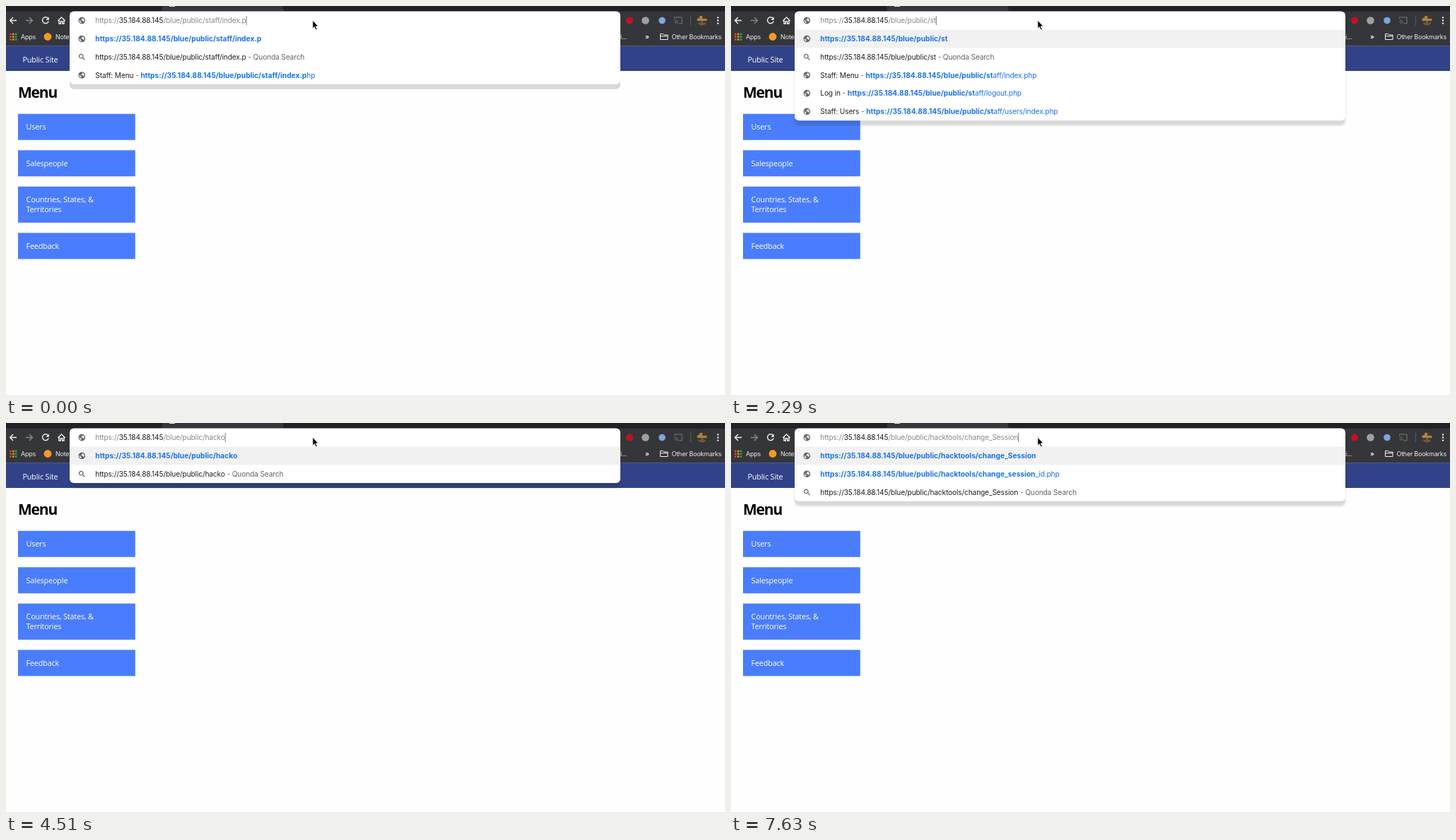
An HTML page that plays this animation: 1017 px wide and 551 px high, repeating every 8 s.

```html
<!DOCTYPE html>
<html lang="en">
<head>
<meta charset="utf-8">
<title>Address bar</title>
<style>
  html, body { margin: 0; width: 100%; height: 100%; overflow: hidden; background: #fff; }
  svg { display: block; width: 100vw; height: 100vh; }
  text { white-space: pre; }
  .page { font: 10.8px "Open Sans", "Noto Sans", sans-serif; letter-spacing: -.15px; fill: #fff; }
  .page .title { font-size: 21px; font-weight: 700; letter-spacing: -1.2px; fill: #000; }
  .bar { font: 9px Inter, Roboto, sans-serif; letter-spacing: -.24px; fill: #e8eaed; }
  .omni { font: 10.2px Inter, Roboto, sans-serif; letter-spacing: -.15px; fill: #202124; }
  .dim { fill: #5f6368; }
  .pale { fill: #85898d; }
  .link { fill: #1a73e8; }
  .hit { fill: #1a73e8; font-weight: 700; letter-spacing: .012px; }
  .line { fill: none; stroke: #f1f3f4; stroke-width: 1.4; }
</style>
</head>
<body>
<svg viewBox="0 0 1017 551" preserveAspectRatio="none">
  <defs>
    <filter id="blur" x="-5%" y="-20%" width="110%" height="150%"><feGaussianBlur stdDeviation="1.7"/></filter>
    <clipPath id="face"><circle cx="984.5" cy="20.5" r="7"/></clipPath>
    <g id="globe">
      <circle r="4.8" fill="#5f6368"/>
      <path d="M-3.7-.8L-.8 1.6V3.8C-2.8 3.4-4 1.6-3.7-.8ZM.6-3.7C2.4-3.2 3.6-1.8 3.7.2L2.2 1.8 1.2.2-1.2-.4-.6-1.8.8-2.2Z" fill="#e4e5e6"/>
    </g>
    <g id="lens" fill="none" stroke="#5f6368" stroke-width="1.2">
      <circle cx="-1" cy="-1" r="2.8"/><path d="M1 1L4.2 4.2"/>
    </g>
  </defs>

  <rect width="1017" height="551" fill="#fefefe"/>
  <rect width="1017" height="9" fill="#202124"/>
  <path d="M217 8Q221 8 221 3V0H392V3Q392 8 396 8Z" fill="#35363a"/>
  <rect x="231" width="8" height="1" fill="#e8eaed"/>
  <rect y="7.6" width="1017" height="49" fill="#35363a"/>
  <rect y="56.4" width="1017" height="35.6" fill="#314289"/>

  <g class="line">
    <path d="M15 20.5H6M10 16L5.6 20.5 10 25"/>
    <path d="M28 20.5H37M33 16L37.4 20.5 33 25" stroke="#85878a"/>
    <path d="M59.4 17.4A4.4 4.4 0 1 0 60.2 21.5"/>
    <path d="M73.4 21L78.5 16 83.6 21M75 20V25H77.3V21.8H79.7V25H82V20"/>
  </g>
  <path d="M60.8 15.4V19.8H56.4Z" fill="#f1f3f4"/>
  <g id="apps"></g>
  <circle cx="59" cy="43.5" r="5.4" fill="#f59a23"/>
  <g class="bar">
    <text x="21" y="46.8">Apps</text>
    <text x="70" y="46.8">Notes</text>
    <text x="869" y="46.8">i...</text>
    <text x="904" y="46.8" font-weight="700">»</text>
    <text x="941.5" y="46.8">Other Bookmarks</text>
  </g>
  <path d="M925.5 39.5H929.5L930.8 41H936V47.5H925.5ZM925.5 42.7H936" class="line" style="stroke-width:1"/>
  <circle cx="882" cy="20.5" r="5" fill="#c4121f"/>
  <circle cx="904.5" cy="20.5" r="5.3" fill="#9da0a3"/>
  <circle cx="928" cy="20.5" r="4.8" fill="#7fa5dc"/>
  <path d="M945.5 18V16H956V25H952M945.5 20A5 5 0 0 1 950.5 25M945.5 22.5A2.5 2.5 0 0 1 948 25" fill="none" stroke="#76797c"/>
  <path d="M968.5 14V27" stroke="#5b5d61"/>
  <g clip-path="url(#face)">
    <rect x="977" y="13" width="15" height="15" fill="#4b3a25"/>
    <path d="M977 17H981V14H985V18H992V21H977Z" fill="#a8834e"/>
    <path d="M977 24H983V21H986V24H992V28H977Z" fill="#6f5a38"/>
  </g>
  <g fill="#f1f3f4">
    <circle cx="1007" cy="16.4" r="1.2"/><circle cx="1007" cy="20.5" r="1.2"/><circle cx="1007" cy="24.6" r="1.2"/>
  </g>

  <g class="page">
    <text x="23.5" y="79.5">Public Site</text>
    <text x="17" y="129.5" class="title">Menu</text>
    <g fill="#4a7dfd">
      <rect x="17" y="152.8" width="165.8" height="37"/>
      <rect x="17" y="204.3" width="165.8" height="37"/>
      <rect x="17" y="255.7" width="165.8" height="51.2"/>
      <rect x="17" y="321.4" width="165.8" height="37"/>
    </g>
    <text x="28.5" y="175">Users</text>
    <text x="28.5" y="226.7">Salespeople</text>
    <text x="28.5" y="278">Countries, States, &amp;</text>
    <text x="28.5" y="292.4">Territories</text>
    <text x="28.5" y="344">Feedback</text>
  </g>

  <g id="panel" class="omni"></g>
  <rect id="caret" y="14" width=".9" height="13" fill="#6a6d70"/>
  <path d="M433.8 20.3V31.9L436.4 29.5 438.3 33.9 440.2 33.1 438.3 28.8H441.8Z" stroke="#fff" stroke-width=".8"/>
</svg>
<script>
const LOOP = 8000, TEXT_X = 126.3, TOP = 7.6, PITCH = 25.72;
const SCHEME = "https://", HOST = "35.184.88.145", FOLDER = "/blue/public/";
const BASE = SCHEME + HOST + FOLDER;
const $ = id => document.getElementById(id);

// Suggestions: [title, path below BASE]
const PAGES = {
  M: ["Staff: Menu", "staff/index.php"],
  L: ["Log in", "staff/logout.php"],
  U: ["Staff: Users", "staff/users/index.php"],
  H: ["Fernolix", ""],
  I: ["Fernolix", "index.php"],
  C: ["Change PHPSESSIONID", "hacktools/change_session_id.php"],
  B: ["", "hacktools/change_session_id.php"],
  P: ["Salesperson: Loren Pavik", "salesperson.php?id=1%27 AND SLEEP(5)=0--%27"],
  Q: ["", "salesperson.php?id=4 %27 OR SLEEP(5)=0--%27"]
};

// [time, typed path, rows]; u = typed address, s = web search
const STEPS = [
  [0, "staff/index.p", "usM"],
  [300, "staff/index.", "usM"],
  [480, "staff/index", "usM"],
  [660, "staff/ind", "usM"],
  [950, "staff/in", "usM"],
  [1100, "staff/i", "usM"],
  [1550, "staff/", "usM"],
  [1700, "staff/", "usMLU"],
  [1850, "staff", "usMLU"],
  [2000, "staf", "usMLU"],
  [2130, "sta", "usMLU"],
  [2280, "st", "usMLU"],
  [2430, "s", "uPsQML"],
  [2730, "", "HCPsQI"],
  [3920, "h", "uCs"],
  [4070, "ha", "uCs"],
  [4220, "hac", "uCs"],
  [4360, "hack", "uCs"],
  [4510, "hacko", "us"],
  [4950, "hack", "uCs"],
  [5100, "hackto", "uCs"],
  [5240, "hacktool", "uCs"],
  [5390, "hacktools/", "uCs"]
];
const typeOut = (start, gap, head, word, rows) => {
  for (let i = 1; i <= word.length; i++)
    STEPS.push([start + gap * (i - 1), head + word.slice(0, i), rows]);
};
typeOut(5690, 147, "hacktools/", "change", "uCs");
STEPS.push([6730, "hacktools/change_", "uCs"]);
typeOut(6880, 150, "hacktools/change_", "Sessi", "uBs");
STEPS.push([7630, "hacktools/change_Session", "uBs"]);

const span = (cls, s) => `<tspan class="${cls}">${s}</tspan>`;
const icon = (id, y) => `<use href="#${id}" x="107.3" y="${y}"/>`;
const label = (y, body, id = "") => `<text ${id} x="${TEXT_X}" y="${y + 3.7}">${body}</text>`;

function rowBody(kind, typed) {
  if (kind === "u") return span("hit", BASE + typed);
  if (kind === "s") return BASE + typed + span("dim", " - Quonda Search");
  const [title, path] = PAGES[kind], n = typed.length;
  return (title && title + span("dim", " - ")) +
    span("hit", BASE + path.slice(0, n)) + span("link", path.slice(n));
}

function drawPanel(start, typed, rows) {
  const h = 26 + PITCH * rows.length, early = start < 1550;
  const box = (dy, attrs) => `<rect x="90" y="${TOP + dy}" width="779" height="${h}" rx="6" ${attrs}/>`;
  let out = box(7, `opacity=".17" ${early ? "" : 'filter="url(#blur)"'}`) + box(0, 'fill="#fff"');
  if (!early) out += `<rect x="90" y="33.6" width="779" height="${PITCH}" fill="#f1f1f1"/>`;
  out += icon("globe", 20.6) + label(20.6,
    span("pale", SCHEME) + HOST + span("pale", FOLDER + typed), 'id="address"');
  [...rows].forEach((kind, i) => {
    const y = 46.5 + PITCH * i;
    out += icon(kind === "s" ? "lens" : "globe", y) + label(y, rowBody(kind, typed));
  });
  $("panel").innerHTML = out;
  $("caret").setAttribute("x", TEXT_X + $("address").getComputedTextLength());
}

const COLORS = ["#ea4335", "#f29900", "#34a853", "#4285f4"];
for (let i = 0; i < 9; i++) {
  const col = i % 3, row = i / 3 | 0;
  $("apps").innerHTML += `<rect x="${5.2 + col * 3.8}" y="${38.6 + row * 3.8}" width="2.5" height="2.5" fill="${COLORS[(i + row) % 4]}"/>`;
}

let shown = null;
function render(t) {
  const step = STEPS.filter(s => s[0] <= t).pop();
  if (step !== shown) drawPanel(...(shown = step));
  $("caret").setAttribute("opacity", t >= 3180 && t < 3630 ? 0 : 1);
}

const origin = performance.now();
function tick() {
  render((performance.now() - origin) % LOOP);
  requestAnimationFrame(tick);
}
tick();
</script>
</body>
</html>
```
